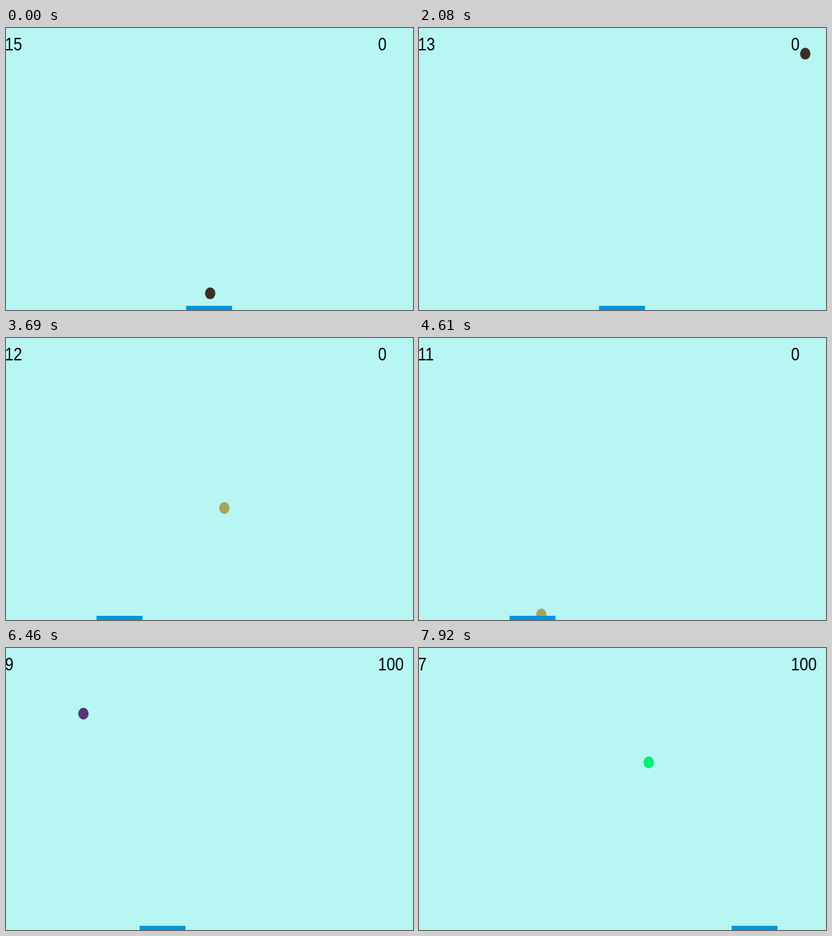
An HTML page with a canvas that plays this animation: 582x403 px, repeating every 8 s.

```html
<!DOCTYPE html>
<html lang="en">
<head>
<meta charset="utf-8">
<title>Paddle game</title>
<style>
  html, body { margin: 0; width: 100%; height: 100%; overflow: hidden; background: #b7f6f3; }
  canvas { display: block; }
</style>
</head>
<body>
<canvas id="stage" width="582" height="403"></canvas>
<script>
const ctx = document.getElementById("stage").getContext("2d");
const LOOP = 8000;
const FPS = 13;
const SQUASH = 0.88; // the playfield is narrower than tall
const FIRST_TICK = 885; // first countdown second, ms

// Paths are [step, value] corners; bounces are the corners.
const ballX = [[0, 292], [24.88, 576.6], [74.82, 5.5], [104, 340]];
const ballY = [[0, 379.2], [29.365, 6.7], [60.1, 396.4], [90.76, 8.3], [104, 176.2]];
const paddleX = [
  [0, 257.5], [35.94, 257.5], [39.27, 129.5], [82.4, 129.5], [84, 191],
  [88, 345], [89.7, 411], [101, 411], [102, 447], [104, 447]
];
const ballColors = ["#3b2f25", "#a8a35e", "#55356f", "#00ee6e"];

function along(path, n) {
  let i = 1;
  while (i < path.length - 1 && path[i][0] < n) i++;
  const [n0, v0] = path[i - 1];
  const [n1, v1] = path[i];
  return v0 + (v1 - v0) * (n - n0) / (n1 - n0);
}

function drawBall(n) {
  const bounces = ballY.slice(1, -1).filter(([step]) => step < n).length;
  ctx.fillStyle = ballColors[bounces];
  ctx.beginPath();
  ctx.ellipse(along(ballX, n), along(ballY, n), 8.4 * SQUASH, 8.4, 0, 0, Math.PI * 2);
  ctx.fill();
}

function drawNumber(value, x) {
  ctx.save();
  ctx.scale(SQUASH, 1);
  ctx.font = "25px 'Liberation Sans', Arial, sans-serif";
  ctx.fillStyle = "#000";
  ctx.fillText(String(value), x / SQUASH, 32);
  ctx.restore();
}

function draw(time) {
  const n = Math.min(103, Math.floor((time + 6) * FPS / 1000));
  const shown = n * 1000 / FPS;

  ctx.fillStyle = "#b7f6f3";
  ctx.fillRect(0, 0, 582, 403);
  drawBall(n);
  ctx.fillStyle = "#0095dd";
  ctx.fillRect(along(paddleX, n), 397, 65.7, 6);

  drawNumber(15 - Math.floor((shown + 1000 - FIRST_TICK) / 1000), -1.5);
  drawNumber(n > ballY[2][0] ? 100 : 0, 532);
}

const start = performance.now();
function frame() {
  draw((performance.now() - start) % LOOP);
  requestAnimationFrame(frame);
}
frame();
</script>
</body>
</html>
```
